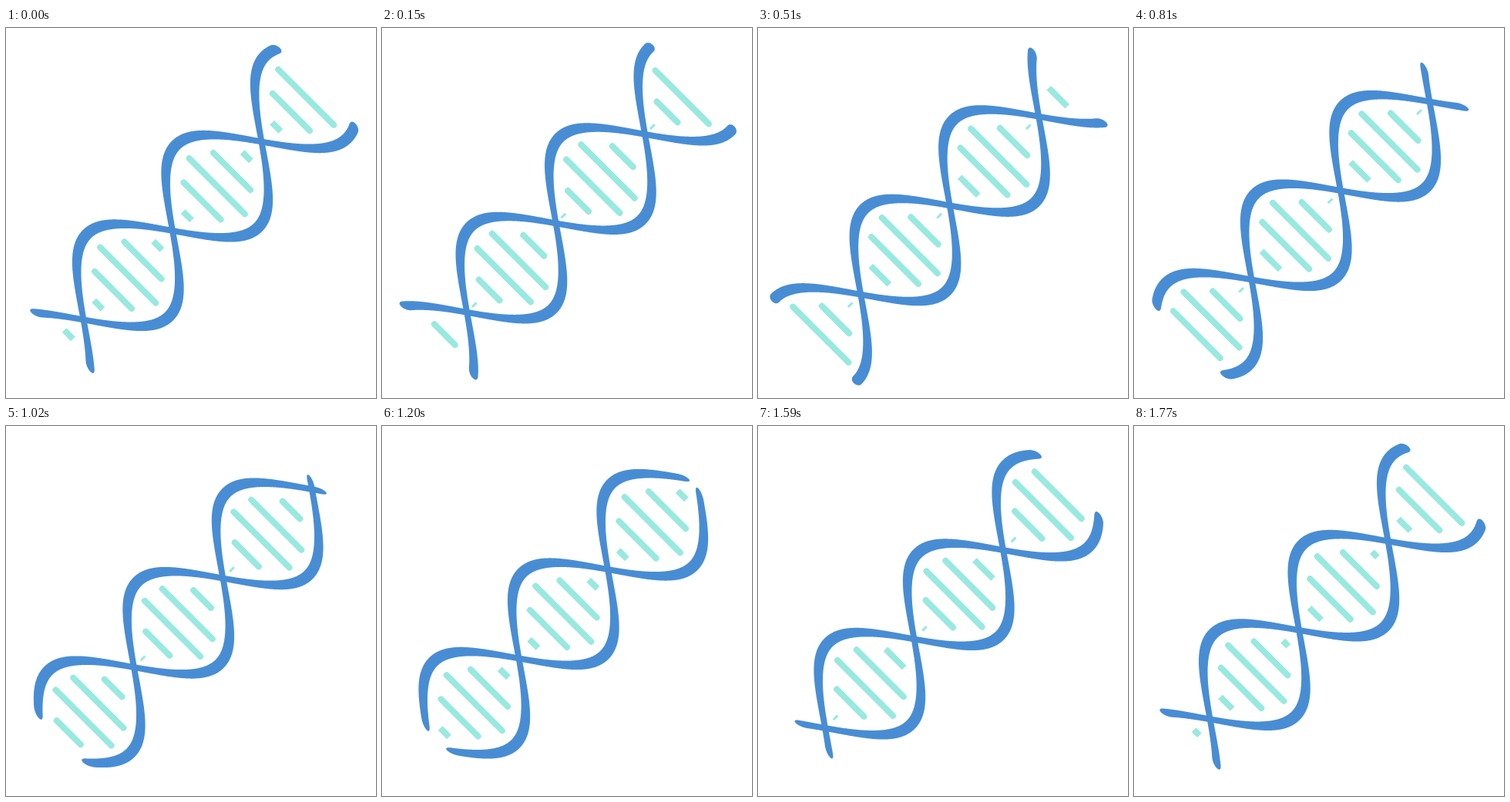
An HTML page with a canvas for the animation above (1.8 s loop, 480 by 480 pixels).

```html
<!DOCTYPE html>
<html lang="en">
<head>
<meta charset="utf-8">
<title>Turning helix</title>
<style>
html, body { margin: 0; width: 100%; height: 100%; overflow: hidden; background: #fff; }
canvas { display: block; width: 480px; height: 480px; }
</style>
</head>
<body>
<canvas id="stage" width="480" height="480"></canvas>
<script>
const ctx = document.getElementById('stage').getContext('2d');
const LOOP = 1800, STEP = 30;
const LOBE = 163.3;             // distance between crossings along the axis
const GAP = LOBE / 6;           // distance between rungs
const ORIGIN = -33.2;           // a crossing at time zero
const AMP = 75.4;
const START = -238, END = 233, CAP = 6;

// Half thickness of a strand, measured across the axis, rounded at both ends
function halfWidth(u, phase) {
  const slope = AMP * Math.PI / LOBE * Math.cos(phase);
  const edge = Math.min(1, (u - START) / CAP, (END - u) / CAP);
  const round = Math.sqrt(1 - (1 - edge) ** 2);
  return (3.9 + 3.6 * Math.sin(phase) ** 2) * Math.hypot(1, slope) * round;
}

function strand(shift, sign) {
  const upper = [], lower = [];
  for (let u = START; u <= END; u += 0.5) {
    const phase = Math.PI * (u - shift) / LOBE;
    const v = sign * AMP * Math.sin(phase);
    const w = halfWidth(u, phase);
    upper.push([u, v - w]);
    lower.unshift([u, v + w]);
  }
  ctx.beginPath();
  for (const [u, v] of upper.concat(lower)) ctx.lineTo(u, v);
  ctx.fill();
}

// Rungs stay in place; their length follows the passing wave
function rung(u, shift) {
  const turn = (((u - shift) / LOBE) % 1 + 1) % 1 * 180;
  if (turn < 14 || turn > 163) return;
  const half = Math.min(55, Math.max(1.5, Math.min(turn, 180 - turn) - 22));
  const round = half > 18;
  const reach = round ? half - 4 : half;
  ctx.lineCap = round ? 'round' : 'butt';
  ctx.beginPath();
  ctx.moveTo(u, -reach);
  ctx.lineTo(u, reach);
  ctx.stroke();
}

function draw(time) {
  const t = Math.floor((time + 1) / STEP) * STEP % LOOP;
  const shift = ORIGIN + LOBE * t / LOOP;
  ctx.setTransform(1, 0, 0, 1, 0, 0);
  ctx.fillStyle = '#fff';
  ctx.fillRect(0, 0, 480, 480);
  ctx.translate(239.5, 239.5);
  ctx.rotate(-Math.PI / 4);
  ctx.strokeStyle = '#98e9df';
  ctx.lineWidth = 8;
  for (let k = -7; k <= 9; k++) rung(ORIGIN + k * GAP, shift);
  ctx.fillStyle = '#488dd4';
  strand(shift, 1);
  strand(shift, -1);
}

const began = performance.now();
function tick() {
  draw(performance.now() - began);
  requestAnimationFrame(tick);
}
tick();
</script>
</body>
</html>
```
